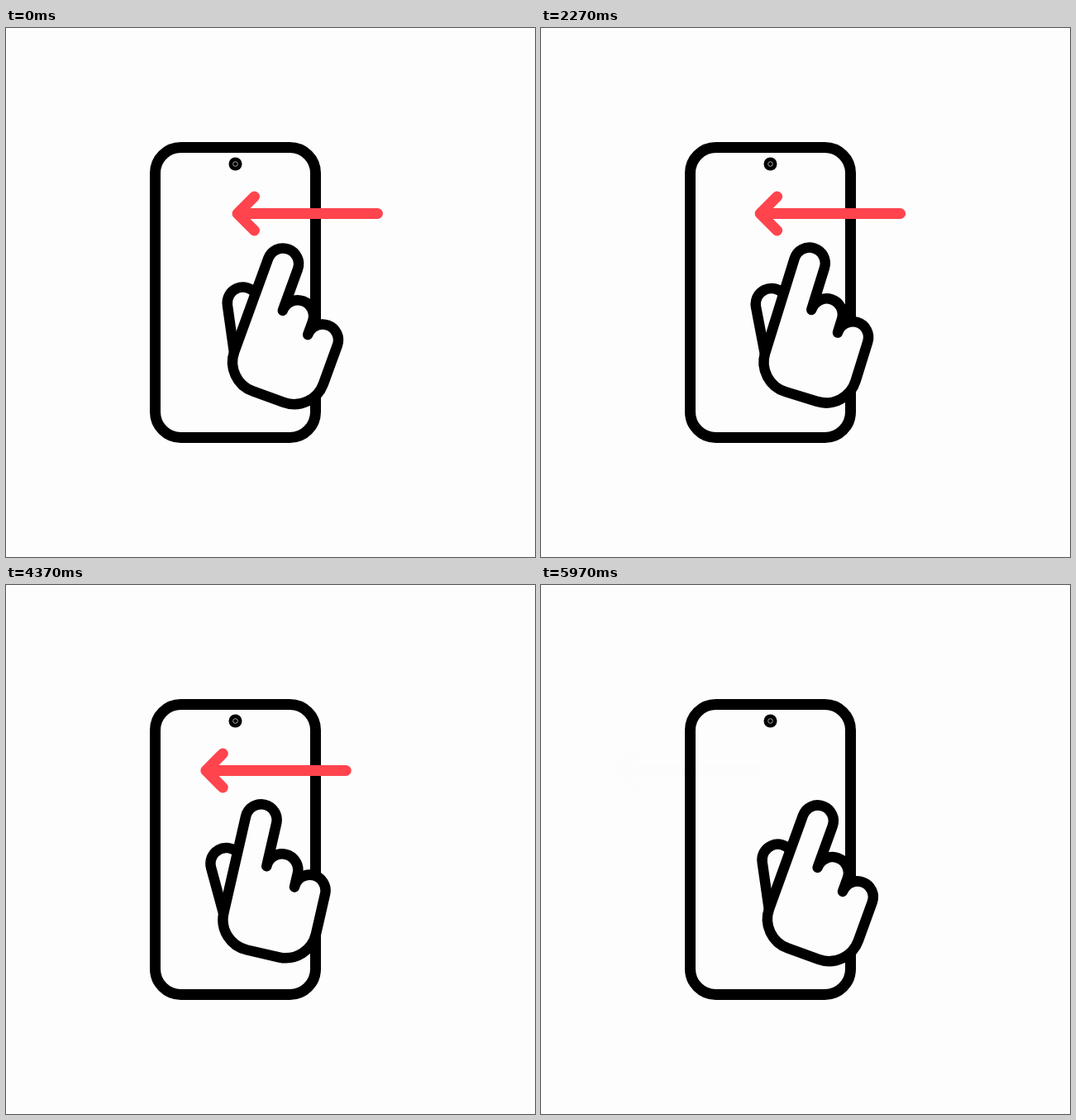
An HTML page for the animation above (6.01 s loop, 640x640 px).

```html
<!DOCTYPE html>
<html lang="en">
<head>
<meta charset="utf-8">
<title>Swipe left</title>
<style>
  html, body { margin: 0; width: 100%; height: 100%; overflow: hidden; background: #fdfdfd; }
  svg { display: block; width: 100%; height: 100%; }
  .line { fill: none; stroke: #000; stroke-width: 12.5; stroke-linecap: round; stroke-linejoin: round; }
  .skin { fill: #fdfdfd; }
  .bold { stroke-width: 13; }
  .red { stroke: #ff444e; }
</style>
</head>
<body>
<svg viewBox="0 0 640 640">
  <rect class="line bold" x="180.5" y="144.5" width="194" height="351" rx="31"/>
  <circle cx="277.5" cy="164.5" r="8"/>
  <circle cx="277.5" cy="164.5" r="2.8" fill="none" stroke="#aaa" stroke-width="1"/>
  <g id="arrow">
    <path class="line bold red" d="M449.5 224.5H280M300.5 204L280 224.5L300.5 245"/>
  </g>
  <!-- the hand's origin is the wrist it swings around -->
  <g id="hand">
    <path class="line skin" d="M-70-162.7A19 19 0 0 0-97-137.6L-69.5-86"/>
    <path class="line skin" d="M-32-154.5V-207.6A19 19 0 0 0-70-207.6V-88A37.5 37.5 0 0 0-32.5-50.5H7A37.5 37.5 0 0 0 44.5-88V-137.5A19 19 0 0 0 6.5-137.5V-154.5A19 19 0 0 0-32-154.5"/>
  </g>
</svg>
<script>
  const LOOP = 6010, CYCLE = 2000, HALF = CYCLE / 2;
  const arrow = document.getElementById('arrow');
  const hand = document.getElementById('hand');
  const clamp = p => Math.min(1, Math.max(0, p));
  const cubicInOut = p => p < .5 ? 4 * p ** 3 : 1 - 4 * (1 - p) ** 3;
  const sineInOut = p => (1 - Math.cos(Math.PI * p)) / 2;

  function draw(now) {
    const t = Math.min(now % LOOP, 3 * CYCLE - 1) % CYCLE;
    const swipe = cubicInOut(clamp(t / HALF));
    const back = sineInOut(clamp(t / HALF - 1));
    const angle = 20 - 34.8 * (swipe - back);
    const lift = 1 + .055 * Math.sin(Math.PI * back) ** 2;

    arrow.setAttribute('transform', `translate(${-187 * swipe} 0)`);
    arrow.setAttribute('opacity', 1 - back);
    hand.setAttribute('transform',
      `translate(312 498) rotate(${angle}) translate(-20 -100) scale(${lift}) translate(20 100)`);
    requestAnimationFrame(() => draw(performance.now() - start));
  }

  const start = performance.now();
  draw(0);
</script>
</body>
</html>
```
